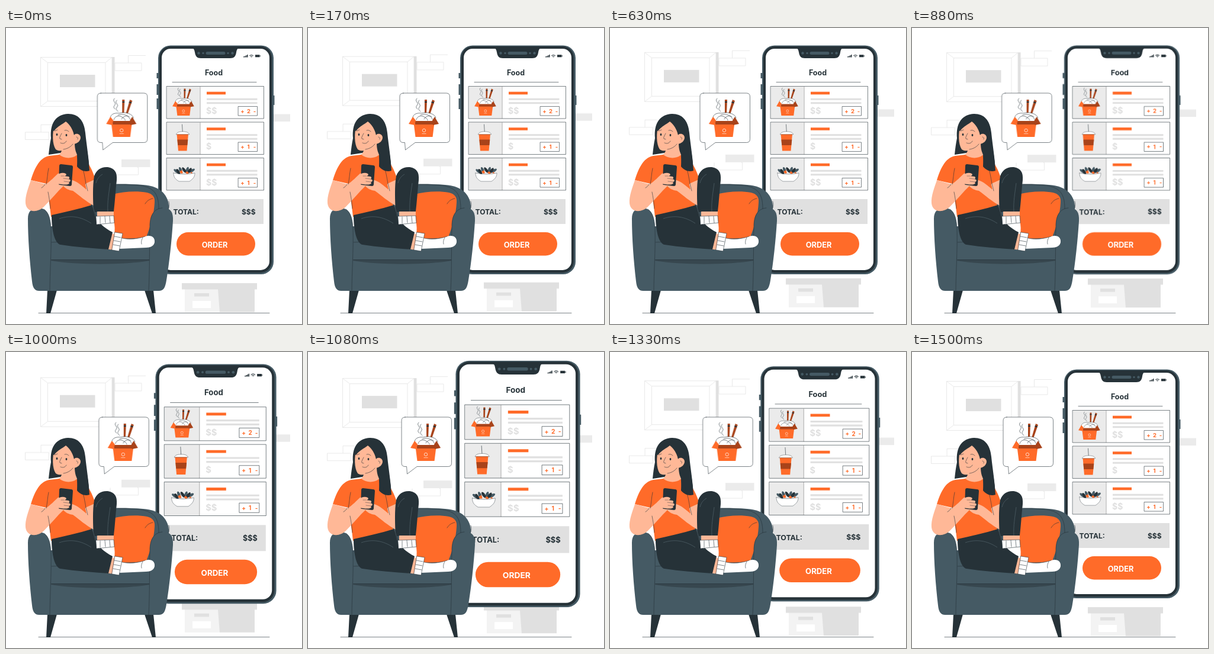
An HTML page for the animation above (1.54 s loop, 500 by 500 pixels).

```html
<!DOCTYPE html>
<html lang="en">
<head>
<meta charset="utf-8">
<title>Food order</title>
<style>
html, body { margin: 0; width: 100%; height: 100%; overflow: hidden; background: #fff; }
svg { display: block; width: 100vw; height: 100vh; }
text { font-family: Inter, "Open Sans", sans-serif; font-weight: 700; }
.or { fill: #ff6b29; }
.dk { fill: #263238; }
.sl { fill: #455a64; }
.sk { fill: #ffb897; }
.wh { fill: #fff; }
.g1 { fill: #e0e0e0; }
.g2 { fill: #ebebeb; }
.br { fill: #a8431a; }
.ln { fill: none; stroke: #263238; stroke-width: .6; stroke-linecap: round; stroke-linejoin: round; }
.lt { fill: none; stroke: #e4e4e4; stroke-width: .8; }
.float { animation: float 1540ms -40ms infinite; }
.pulse { animation: pulse 1540ms linear infinite; transform-origin: 354px 220px; }
.shake { animation: shake 1540ms cubic-bezier(.3, 0, .7, 1) infinite; }
@keyframes float {
  0%, 100% { transform: translateY(0); animation-timing-function: ease-in-out; }
  50% { transform: translateY(-8.5px); animation-timing-function: ease-in-out; }
}
@keyframes pulse {
  0%, 57.1%, 91.2%, 100% { transform: scale(1); }
  74% { transform: scale(1.1); }
}
@keyframes shake {
  0%, 100% { transform: translateX(-.7px); }
  9.7% { transform: translateX(0); }
  19.5%, 97.4% { transform: translateX(-1px); }
  29.2%, 87.7% { transform: translateX(2px); }
  39%, 58.8%, 77.9% { transform: translateX(-4px); }
  48.7%, 68.2% { transform: translateX(4px); }
}
</style>
</head>
<body>
<svg viewBox="0 0 500 500">
  <defs>
    <g id="noodles">
      <path class="ln" d="M184 119q-3 3 0 6t0 6 1 6M188 122q-3 3 0 6t0 6 2 7"/>
      <path class="br" d="M197 121h4l-1 25h-3zM210 121l4 2-8 23-3-1z"/>
      <path class="dk" d="M197 124h4v2h-4zM209 124l4 1.500-.7 2-4-1.500z"/>
      <path class="br" d="M178 149h36l-2 15h-31z"/>
      <path class="wh" d="M177 152c0-7 8-9 15-8 10-3 23 1 24 8l-4 5h-31z"/>
      <path class="ln" d="M177 152c0-7 8-9 15-8 10-3 23 1 24 8M183 155c1-6 8-8 13-5s6 4 6 6M190 147c8-3 18 0 20 7M196 154c2-5 9-7 13-4"/>
      <path class="or" d="M178 156l3 7h30l3-7-3.500 28h-29z"/>
      <path class="or" d="M177 150l-7 12 10 2 2-8z"/>
      <path class="br" d="M214 150l7 12-10 2-1-8z"/>
      <circle cx="196" cy="173" r="2.700" fill="none" stroke="#fff" stroke-width=".7"/>
      <path d="M192.500 178.500h7" stroke="#fff" stroke-width=".6"/>
    </g>
    <g id="row">
      <path class="wh" d="M271.500 98.500h164v54.500h-164z"/>
      <path class="g2" d="M272 99h55.500v53.700H272z"/>
      <path d="M328 99v54" stroke="#b5b5b5" stroke-width="1.200"/>
      <path class="ln" d="M271.500 98.500h164v54.500h-164z"/>
      <path class="or" d="M339 107.700h32v4.600h-32z"/>
      <path class="g1" d="M339 118.800h85.500v3H339zM339 125.200h85.500v3H339z"/>
      <path class="ln" d="M392.500 132.500h32V148h-32z"/>
      <g class="or" font-size="9.500" text-anchor="middle">
        <text x="399.500" y="143.500">+</text>
        <text x="420" y="143.500">-</text>
      </g>
    </g>
    <ellipse id="leaf" rx="2.300" ry="5.500"/>
  </defs>

  <g class="float">
    <path class="lt" d="M206.500 59V46.500h29.500M206.500 59h22.500v13h-45V59zM79 163.500H59v12.500M32.500 176h40v12.500h-40zM222 235.500h1.500v12.500H176v-12.500"/>
    <path class="g2" d="M195 222h48.500v13H195zM440 145.500h40V158h-40z"/>
    <path class="wh" d="M58.500 49.500h124v83h-124z"/>
    <path class="g1" d="M179 49h4.500v83.500H179z"/>
    <path class="lt" d="M58.500 49.500H179v83H58.500zM70.500 58.500H168v65H70.500zM58.500 49.500l12 9M179 49.500l-11 9M58.500 132.500l12-9M179 132.500l-11-9"/>
    <path class="g1" d="M91 79h59.500v21H91z"/>
    <path fill="#f3f3f3" d="M302 441h60v39h-60z"/>
    <path class="g1" d="M297 431h127v10.500H297zM358 441h62v39h-59zM318 448h25v5.500h-25z"/>
    <path class="wh" d="M315 461h31v12h-31z"/>
  </g>

  <path class="ln" d="M55 481.500h390"/>

  <g class="pulse">
    <path class="sl" d="M254.500 76h4v9h-4zM254.500 95h4v18h-4zM254.500 119h4v18h-4zM450 114h3.500v16H450z"/>
    <rect class="sl" x="257" y="29.500" width="195" height="386.500" rx="21"/>
    <rect class="dk" x="259" y="31" width="190" height="382.500" rx="19"/>
    <rect class="wh" x="263" y="35" width="182" height="374" rx="15"/>
    <path class="dk" d="M314 34c4 1 4 3 5 7 1 7 4 10 10 10h50c6 0 9-3 10-10 1-4 1-6 5-7z"/>
    <rect class="sl" x="337.500" y="40" width="33" height="5" rx="2.500"/>
    <g class="sl">
      <circle cx="325.500" cy="42.500" r="2.200"/><circle cx="333" cy="42.500" r="1.800"/>
      <circle cx="375" cy="42.500" r="1.800"/><circle cx="382.500" cy="42.500" r="2.200"/>
    </g>
    <path class="dk" d="M401 48h1.500v1.500H401zM403 47.200h1.500v2.300H403zM405 46.200h1.500v3.300H405zM407 45h1.500v4.500H407zM421 45.200h7.500v4H421zM429 46.200h.8v2H429z"/>
    <path class="ln" style="stroke-width:1" d="M411.500 46.500q3-2.500 6 0M413 48q1.500-1.300 3 0M414.500 49.300v0"/>
    <text class="dk" x="351" y="80" font-size="12.500" text-anchor="middle">Food</text>
    <path class="ln" d="M281 91.500h142"/>

    <use href="#row"/><use href="#row" y="60.500"/><use href="#row" y="121"/>
    <g class="g1" font-size="14">
      <text x="338" y="144.500">$$</text><text x="338" y="205">$</text><text x="338" y="265.800">$$</text>
    </g>
    <g class="or" font-size="9.500" text-anchor="middle">
      <text x="410" y="143.800">2</text><text x="409.500" y="204.300">1</text><text x="409.500" y="264.800">1</text>
    </g>

    <use href="#noodles" transform="translate(158.700 15.500) scale(.72)"/>

    <path class="ln" d="M297.500 163l.8 13"/>
    <path class="or" d="M288.500 179h19.500l-2.500 28.500h-14.500z"/>
    <path class="br" d="M289.500 188.500h17.800l-1 9.500h-16z"/>
    <path class="wh" d="M287.500 179.500c1-3 4-4.500 11-4.500s10 1.500 11 4.500z"/>
    <path class="ln" style="stroke-width:.4" d="M287.500 179.500c1-3 4-4.500 11-4.500s10 1.500 11 4.500z"/>

    <g class="sl">
      <use href="#leaf" transform="translate(288 242) rotate(-55)"/>
      <use href="#leaf" transform="translate(295 240) rotate(-25)"/>
      <use href="#leaf" transform="translate(306 240) rotate(20)"/>
      <use href="#leaf" transform="translate(314 241) rotate(60)"/>
    </g>
    <g class="dk">
      <use href="#leaf" transform="translate(291 243) rotate(-30)"/>
      <use href="#leaf" transform="translate(301 240) rotate(-35)"/>
      <use href="#leaf" transform="translate(310 241) rotate(35)"/>
    </g>
    <path class="or" d="M293 243l4-3 2 5-3 1zM303 244l3-2 3 3-3 2zM311 245l3-2 1 3z"/>
    <path class="wh" d="M283 245q18 4 36 0c0 8-5 11-9 14h-18c-5-3-9-6-9-14z"/>
    <path class="ln" style="stroke-width:.4" d="M283 245q18 4 36 0c0 8-5 11-9 14h-18c-5-3-9-6-9-14z"/>

    <path class="g1" d="M272 289h163v42H272z"/>
    <g class="dk" font-size="12">
      <text x="282.500" y="315">TOTAL:</text><text x="398" y="314.500">$$$</text>
    </g>
    <rect class="or" x="288" y="345" width="133" height="39.500" rx="19.700"/>
    <text class="wh" x="352.500" y="370.500" font-size="12.800" text-anchor="middle">ORDER</text>
  </g>

  <g class="shake">
    <path class="ln" style="fill:#fff" d="M161 110h72.500q6 0 6 6v71.500q0 6-6 6H181l-16.500 12.500-1-12.500H161q-6 0-6-6V116q0-6 6-6z"/>
    <use href="#noodles"/>
  </g>

  <!-- armchair -->
  <path class="dk" d="M70 443h16l-11 39h-7zM234 443h15l4 39h-6z"/>
  <path class="sl" d="M140 270c18-8 60-7 92-5 27 2 41 15 43 35v40H140z"/>
  <path class="ln" d="M188 264.500c25 0 44 0 56 7 12 7 14 20 14 34"/>
  <path class="sl" d="M60 335h195v109H60z"/>
  <path class="ln" d="M75 362q80-4 168 0"/>
  <path class="or" d="M180 281c18-5 42-6 58-3 10 2 14 8 13 17-1 20-7 40-14 58-18 3-38 3-57 2z"/>
  <path class="ln" d="M248 288c-6 1-10 4-13 9"/>
  <path d="M75 391h168v2c-40 7-120 8-168 0z" fill="#37474f"/>
  <path class="ln" d="M74 391.500h169"/>
  <path class="sl" d="M243 335c0-18 6-30 21-31 14-1 19 7 18 22-2 32-6 70-11 100-2 13-5 18-13 18h-17z"/>
  <path class="ln" d="M241 444c2-35 1-80 2-109 0-17 6-30 21-31M275 304c1-4 1-7 0-11"/>
  <path class="sl" d="M37 322c0-13 7-18 18-18 15 0 20 14 21 34 2 38-1 74-1 106H56c-8 0-11-6-12-16-4-34-7-74-7-106z"/>
  <path class="ln" d="M64 306c9 6 11 18 12 32 1 40-2 74-2 106"/>

  <!-- hair, head and body -->
  <path class="dk" d="M72 214c1-10 2-18 4-28-2-25 8-40 29-41 17 0 27 11 29 32 2 20 6 43 7 64-8 3-16-1-20-7l-22-24z"/>
  <path class="sk" d="M96 192h20c0 10 1 18 6 24-5 9-29 9-36 0 7-3 10-9 10-24z"/>
  <path class="or" d="M73 216l17-2c8 7 22 7 29 1l10 3c10 7 17 22 22 38l-17 8c3 13 7 27 12 42-24 6-48 10-70 13-2-20-5-38-8-56l-26-6c5-16 13-38 31-41z"/>
  <path class="dk" d="M117 188l16-5c3 18 7 40 8 58-8 3-16-1-21-7 1-17-1-30-3-46z"/>
  <path class="sk" d="M82 162c-4 16-4 34 2 43 6 5 20 2 29-9 8 0 13-6 13-11s-6-8-11-5l-3-19-12-8z"/>
  <path class="dk" d="M78 175c0-17 9-28 25-29 14 0 23 9 23 31-5-1-9 1-11 4-2-10-8-19-14-23-6 5-14 8-19 15z"/>
  <path class="ln" d="M119 184c2 0 3 2 2 4M94 178c-2 4-4 7-3 9l3 1M92 194c4 2 8 1 10-3M82 174l5-2M99 173c3-1 5 0 7 2M97 205c7-1 12-4 16-9"/>
  <ellipse class="dk" cx="86" cy="180" rx="1.400" ry="2"/>
  <ellipse class="dk" cx="102" cy="181" rx="1.400" ry="2"/>

  <!-- arms and phone -->
  <path class="sk" d="M42 257l25 7c8-5 15-13 22-19l9 21c-12 11-22 24-34 36-10 10-29 11-31-6-1-12 5-27 9-39z"/>
  <path class="sk" d="M134 263l18-8c3 16 1 32-4 45-13-7-24-17-35-25-7-1-13-4-16-8 2-4 6-2 10-3 0-6 2-8 5-7 9 3 16 9 25 17z"/>
  <path class="ln" d="M66 264c-2 3-4 5-6 6M135 263l3 12M71 277c2 9 3 18 4 28M72 237c-2 9-2 18-4 27M127 229c4 10 6 22 8 34"/>
  <path class="dk" d="M93 230l17 2q3 0 3 3l-2 29q0 3-3 3l-17-2q-3 0-2-4l1-28q0-3 3-3z"/>
  <path class="sk" d="M87 248c5-4 10-4 14-2 2 2 0 4-3 4l8 1c2 2 1 4-1 4l3 1c2 2 0 4-2 4l1 2c-1 3-8 3-13 2l-11-1z"/>
  <path class="ln" style="stroke-width:.45" d="M98 250l-5 0M105 255l-8-1M106 260l-8-1"/>

  <!-- trousers and feet -->
  <path class="sk" d="M154 305h28v16h-28zM170 343l18 3-6 29-14-2z"/>
  <path class="dk" d="M148 312c-1-20-2-46 1-62 4-11 12-16 23-15 12 2 16 9 15 22-2 18-3 36-5 53h-27z"/>
  <path class="wh" d="M154 328l28-2c2 8 2 15 1 22l-12-2c-7-5-13-11-17-18z"/>
  <path class="wh" d="M193 354c11 4 28 3 42-2 11-3 17 2 16 10-1 6-7 9-14 9-16 1-30 1-46 2z"/>
  <path class="ln" d="M193 354c11 4 28 3 42-2M157 331c4 7 9 12 15 15M231 354c-2 4-3 7-2 11"/>
  <path class="dk" d="M77 316c22-5 45-10 68-17 8 14 7 24 14 31 7 7 15 12 21 15l-7 29c-27-2-55-4-81-8-10-2-15-25-15-50z"/>
  <path d="M146 300c5 14 5 26 13 33M90 322c18-6 36-4 54 8M176 262c-2 16-5 31-4 48M152 262c2-8 6-12 11-15" fill="none" stroke="#52636b" stroke-width=".7"/>
  <path class="wh" d="M152 318l30-1 1 12-30 3zM184 345l13 2-6 30-12-2z"/>
  <path class="ln" d="M152 318l30-1 1 12-30 3zM184 345l13 2-6 30-12-2zM159 319v11M167 318l1 11M175 318l1 11M183 352l11 2M182 359l11 2M181 366l11 2"/>
</svg>
</body>
</html>
```
